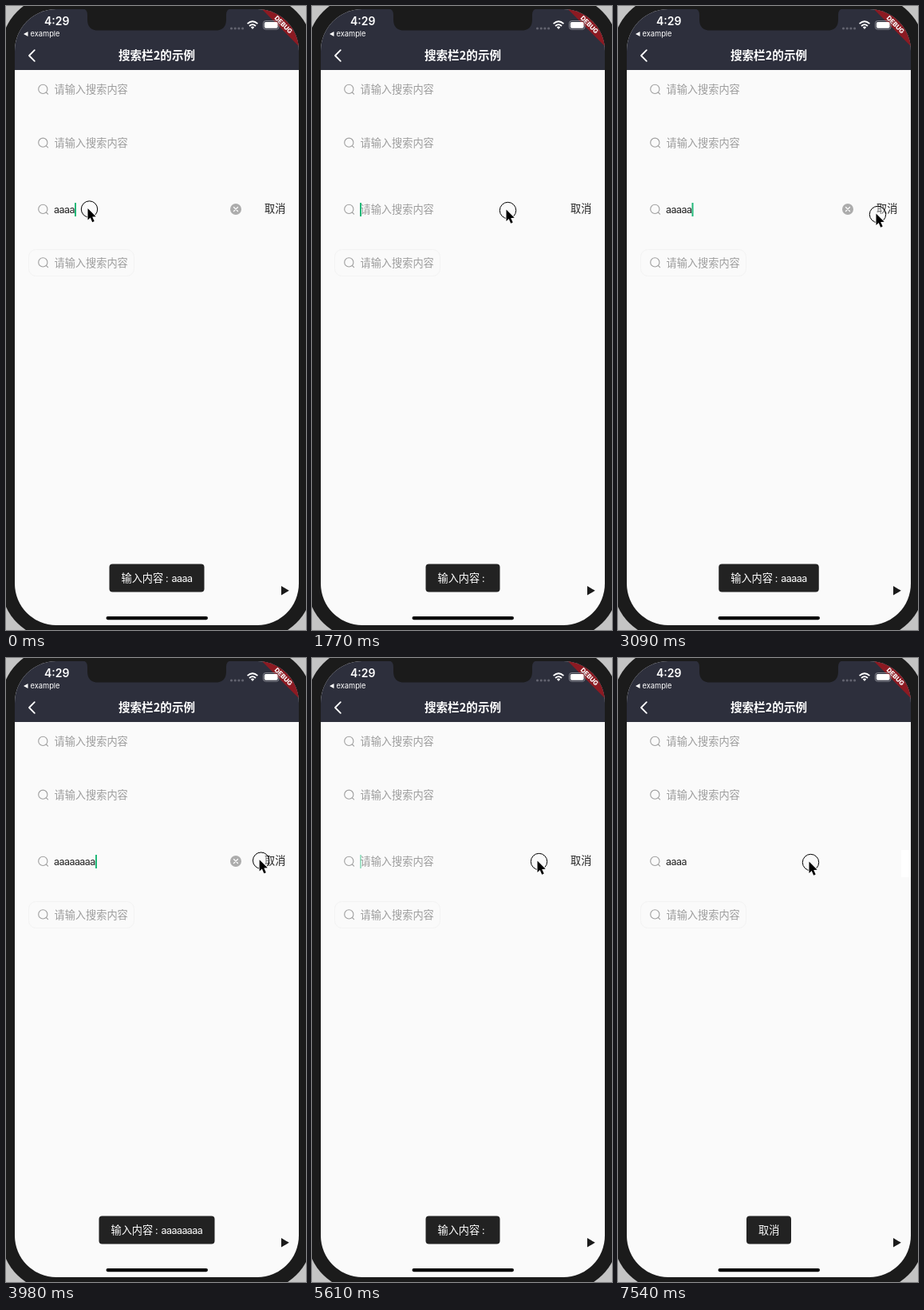
These frames come from a looping animation (376x780 px, 7990 ms). An HTML page:

```html
<!DOCTYPE html>
<html lang="zh">
<head>
<meta charset="utf-8">
<title>搜索栏</title>
<style>
  html, body { margin: 0; width: 100%; height: 100%; overflow: hidden; background: #c4c4c4; }
  svg { display: block; width: 376px; height: 780px; }
  text { font-family: Inter, "Noto Sans CJK SC", "Noto Sans CJK", sans-serif; }
  .cn { font: 13.2px "Noto Sans CJK SC", "Noto Sans CJK", sans-serif; }
  .latin { font-size: 12.5px; letter-spacing: -.55px; }
  .title { font: 700 14.6px "Noto Sans CJK SC", "Noto Sans CJK", sans-serif; }
  .hint { fill: #9c9c9c; }
  .dark { fill: #222; }
  .white { fill: #fff; }
  .line { fill: none; stroke-linecap: round; stroke-linejoin: round; }
</style>
</head>
<body>
<svg viewBox="0 0 376 780">
  <defs>
    <clipPath id="screen"><rect x="11" y="4" width="356" height="770" rx="52"/></clipPath>
    <g id="glass" class="line" stroke="#9f9f9f" stroke-width="1.1">
      <circle cx="46.3" cy="-.6" r="5.6"/><path d="M50.4 3.5L52.6 5.6"/>
    </g>
  </defs>

  <rect x="-6" y="-13" width="390" height="804" rx="68" fill="#1b1b1b"/>
  <g clip-path="url(#screen)">
    <rect width="376" height="780" fill="#fafafa"/>
    <rect width="376" height="80" fill="#2d2f3c"/>
    <g transform="translate(367 4) rotate(45)">
      <rect x="-40" y="21.5" width="80" height="11.2" fill="#8c1a22"/>
      <text y="30" text-anchor="middle" font-size="8" font-weight="800" class="white">DEBUG</text>
    </g>
  </g>
  <path d="M96 3Q102 4 102 11V17Q102 30.6 116 30.6H262Q276 30.6 276 17V11Q276 4 282 3Z" fill="#1b1b1b"/>

  <g class="white">
    <text x="48" y="24" font-size="14" font-weight="600">4:29</text>
    <path d="M22 35L27.5 32V38Z"/>
    <text x="30.5" y="38" font-size="9.3">example</text>
    <path class="line" d="M282.5 28H297" stroke="#62636f" stroke-width="3.2" stroke-dasharray="0 4.7"/>
    <path d="M306.8 26.6Q309 24.6 311.2 26.6L309 29Z"/>
    <path d="M302.6 22.2Q309 16.4 315.4 22.2M305 25Q309 21.2 313 25" fill="none" stroke="#fff" stroke-width="1.8"/>
    <rect x="322.4" y="18.6" width="19.6" height="10.6" rx="3" fill="none" stroke="#9a9ba3" stroke-width=".8"/>
    <rect x="323.8" y="20" width="16.8" height="7.8" rx="1.8"/>
    <text class="title" x="189" y="67" text-anchor="middle">搜索栏2的示例</text>
  </g>
  <path class="line" d="M35.8 55.2L29 62L35.8 68.8" stroke="#fff" stroke-width="1.8"/>

  <rect x="28.5" y="304.5" width="132" height="33" rx="9" fill="#fafafa" stroke="#f3f3f3"/>
  <g id="rows"></g>

  <rect id="patch" x="355" y="240" width="12" height="34" fill="#fff"/>
  <text id="typed" class="latin dark" x="60" y="259"></text>
  <rect id="caret" y="246" width="2" height="17" fill="#20b878"/>
  <g id="clear">
    <circle cx="288" cy="254" r="7" fill="#acacac"/>
    <path class="line" d="M285.5 251.5L290.5 256.5M290.5 251.5L285.5 256.5" stroke="#fff" stroke-width="1.2"/>
  </g>
  <text id="cancel" class="cn dark" x="324" y="258">取消</text>

  <g id="toast">
    <rect id="box" y="697.5" height="35" rx="4" fill="#222"/>
    <g id="label" class="white">
      <text id="word" class="cn" y="720"></text>
      <text id="colon" class="latin" x="55.6" y="719.6">:</text>
      <text id="echo" class="latin" x="63" y="720"></text>
    </g>
  </g>
  <path d="M345 725L354.8 730.8L345 736.6Z" fill="#1a1a1a"/>
  <rect x="125.5" y="763" width="127.5" height="4.2" rx="2.1"/>

  <g id="mouse">
    <circle r="10.2" fill="#fafafa" fill-opacity=".35" stroke="#000"/>
    <path d="M-2 -1V13.4L1.2 10.4L3.7 16.2L6.2 15.1L3.7 9.4L8.2 9.2Z"
      stroke="#fff" stroke-width="1.6" paint-order="stroke"/>
  </g>
</svg>
<script>
const LOOP = 7990, BEAT = 147.5;
const CHAR = 6.5, CANCEL = 47, TOAST_LIFE = 7;
const $ = id => document.getElementById(id);
const show = (id, opacity) => { $(id).style.opacity = +opacity; };

$('rows').innerHTML = [104.5, 171.3, 254.5, 321].map(y =>
  `<use href="#glass" y="${y}"/><text class="cn hint" x="60.5" y="${y + 4.8}">请输入搜索内容</text>`).join('');
const hint = $('rows').querySelectorAll('text')[2];

// One letter per beat from first to last, emptied at clear
const bursts = [
  { first: -3, last: 4, clear: 9 },
  { first: 17, last: 24, clear: 33 },
  { first: 39, last: 42, clear: Infinity },
];

// Pointer stops: beat, x, y
const stops = [[0, 104.5, 254], [6, 284.5, 247.5], [9, 286.5, 253], [12, 245.5, 255.5],
  [16, 245.5, 255.5], [21, 325.5, 260.5], [25, 333, 252], [31, 281.5, 256.5], [33, 284.5, 254.5],
  [38, 284.5, 254.5], [41, 359, 256], [44, 345, 251], [48, 345, 251], [51, 241.5, 255.5]];

function pointer(beat) {
  const i = stops.findLastIndex(s => s[0] <= beat);
  const a = stops[i], b = stops[i + 1] || a;
  const u = (beat - a[0]) / (b[0] - a[0] || 1);
  const ease = u * u * (3 - 2 * u);
  return [1, 2].map(k => a[k] + (b[k] - a[k]) * ease);
}

// Letters in the field and beats since they last changed
function field(beat) {
  const { first, last, clear } = bursts.findLast(b => b.first <= beat);
  if (beat >= clear) return { n: 0, age: beat - clear };
  const end = Math.min(beat, last);
  return { n: end - first + 1, age: beat - end };
}

function caretOpacity(age) {
  const phase = age % 8;
  return phase < 5 ? 1 : phase === 5 ? .4 : 0;
}

function draw(t) {
  const beat = Math.floor((t + 10) / BEAT);
  const { n, age } = field(beat);
  const cancelled = beat >= CANCEL;
  const chars = 'a'.repeat(n);

  $('typed').textContent = chars;
  hint.style.opacity = n ? 0 : 1;
  $('caret').setAttribute('x', 60 + CHAR * n);
  show('caret', cancelled ? 0 : caretOpacity(age));
  show('clear', n > 0 && !cancelled);
  show('cancel', !cancelled);
  show('patch', beat >= 44);

  const textW = cancelled ? 26 : 63 + CHAR * n;
  const left = 189 - textW / 2;
  show('toast', cancelled || age < TOAST_LIFE);
  $('box').setAttribute('x', left - 15);
  $('box').setAttribute('width', textW + 30);
  $('label').setAttribute('transform', `translate(${left})`);
  $('word').textContent = cancelled ? '取消' : '输入内容';
  $('echo').textContent = cancelled ? '' : chars;
  show('colon', !cancelled);

  $('mouse').setAttribute('transform', `translate(${pointer(beat)})`);
}

const start = performance.now();
function tick() {
  draw((performance.now() - start) % LOOP);
  requestAnimationFrame(tick);
}
draw(0);
requestAnimationFrame(tick);
</script>
</body>
</html>
```
